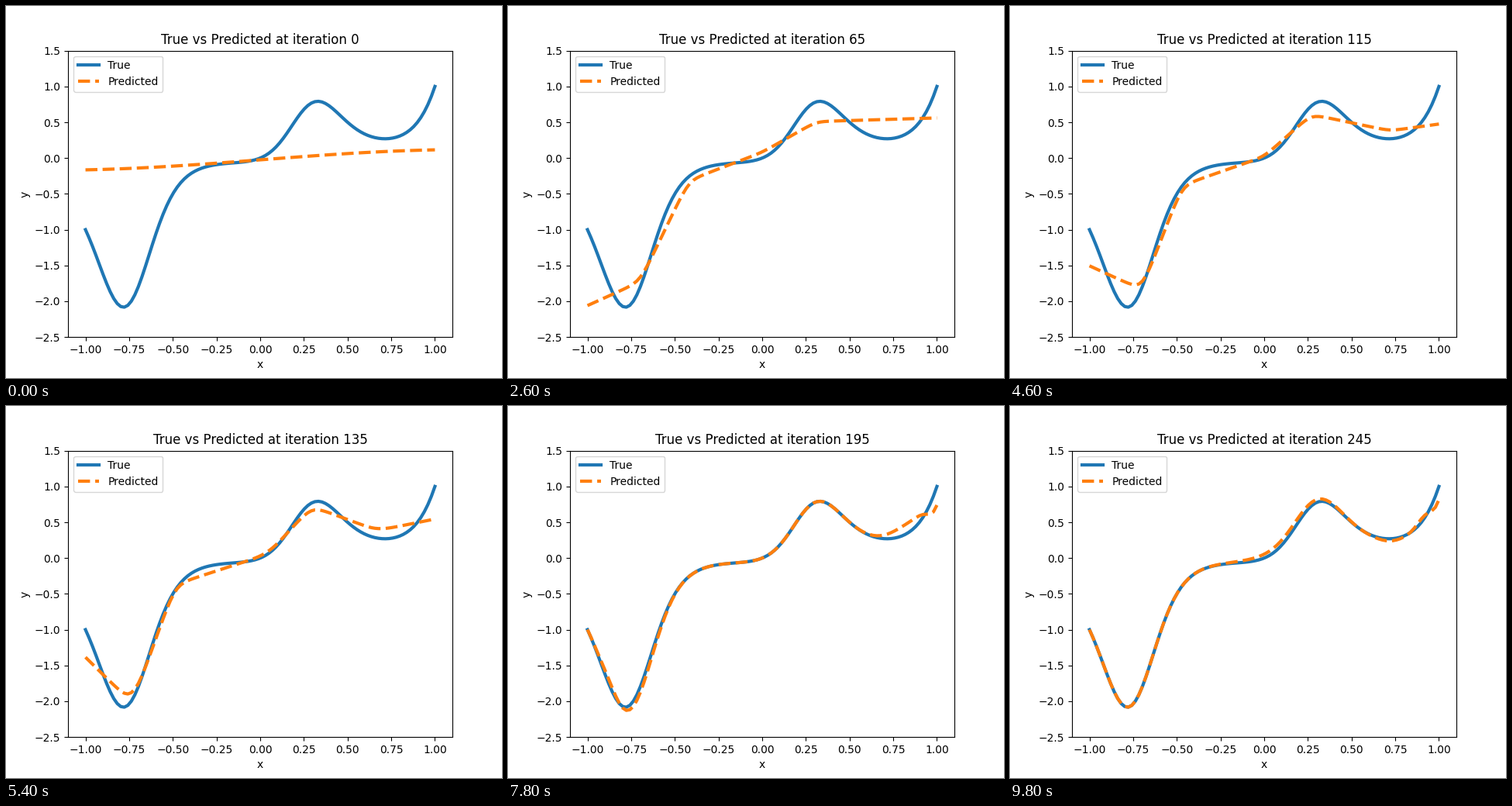
Animation of 640x480 px, one loop 10 s. Source, as a matplotlib script:

```python
import numpy as np
import matplotlib.pyplot as plt
from matplotlib.animation import FuncAnimation

FRAMES, INTERVAL, STEP = 50, 200, 5
SOFT = 0.022  # rounding of each hinge

x = np.linspace(-1, 1, 100)
true_y = x * np.exp(np.sin(2 * np.pi * x))


def hinges(*points):
    """Straight pieces through the points, joined by soft ReLU bends."""
    px, py = np.transpose(points)
    slopes = np.diff(py) / np.diff(px)
    y = py[0] + slopes[0] * (x - px[0])
    for p, bend in zip(px[1:-1], np.diff(slopes)):
        y += bend * SOFT * np.logaddexp(0, (x - p) / SOFT)
    return y


def bump(center, width, height):
    return height * np.exp(-((x - center) / width) ** 2 / 2)


# The fit at selected iterations; the last two are the true curve plus errors
stages = {
    0: -0.025 + 0.145 * np.sin(1.3 * x),
    30: hinges((-1, -2.07), (-.66, -1.5), (-.4, -.45), (-.2, .04),
               (.15, .27), (1, .41)),
    65: hinges((-1, -2.06), (-.7, -1.73), (-.42, -.31), (0, .08),
               (.31, .51), (1, .56)),
    115: hinges((-1, -1.505), (-.7, -1.84), (-.47, -.38), (0, .02),
                (.27, .61), (.72, .38), (1, .475)),
    155: hinges((-1, -1.265), (-.75, -2.19), (-.5, -.35), (.07, .07),
                (.31, .83), (.65, .39), (1, .615)),
    195: true_y + bump(1, .045, -.3) + bump(.84, .1, .14)
         + bump(-.87, .05, .08) + bump(-.7, .1, -.08),
    245: true_y + bump(1, .04, -.19) + bump(.91, .04, .06)
         + bump(.12, .17, .07) + bump(.72, .07, -.03),
}
keys = list(stages)


def predict(iteration):
    k = min(np.searchsorted(keys, iteration, side="right"), len(keys) - 1)
    a, b = keys[k - 1], keys[k]
    u = (iteration - a) / (b - a)
    return (1 - u) * stages[a] + u * stages[b]


fig, ax = plt.subplots(figsize=(6.4, 4.8), dpi=100)
ax.plot(x, true_y, lw=3, label="True")
line, = ax.plot(x, predict(0), "--", lw=3, label="Predicted")
ax.set_ylim(-2.5, 1.5)
ax.set_xlabel("x")
ax.set_ylabel("y")
ax.legend(loc="upper left")
title = ax.set_title("True vs Predicted at iteration 0")


def update(i):
    line.set_ydata(predict(STEP * i))
    title.set_text(f"True vs Predicted at iteration {STEP * i}")
    return line, title


anim = FuncAnimation(fig, update, frames=FRAMES, interval=INTERVAL,
                     repeat=True, repeat_delay=0)
plt.show()
```
